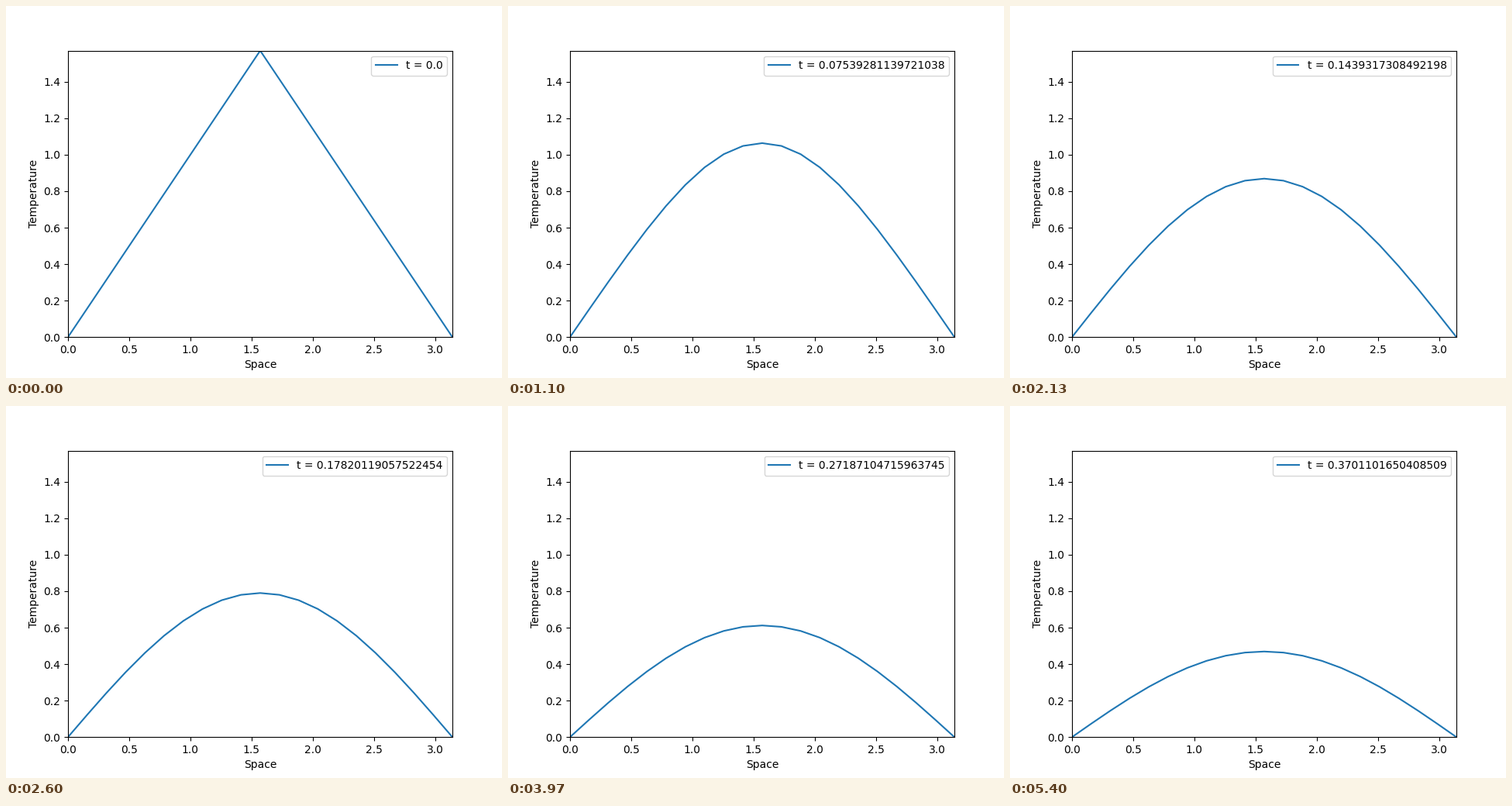
Recreate the animation shown at these times as a matplotlib script. Size 640x480 px, loop 5.43 s.

```python
import numpy as np
import matplotlib.pyplot as plt
from matplotlib.animation import FuncAnimation

LOOP_MS = 5430
FRAMES = 163
CELLS = 20
R = 0.25                  # diffusivity * dt / dx**2
DT = np.pi ** 2 / 4320    # R * dx**2 / 2.7


def solve(u, steps):
    """Explicit heat equation with both ends held at zero."""
    states = [u]
    for _ in range(steps - 1):
        u = u.copy()
        u[1:-1] += R * np.diff(states[-1], 2)
        states.append(u)
    return states


x = np.linspace(0, np.pi, CELLS + 1)
states = solve(np.minimum(x, np.pi - x), FRAMES)

plt.rcParams["font.family"] = "DejaVu Sans"
fig, ax = plt.subplots(figsize=(6.4, 4.8), dpi=100)
ax.set(xlim=(0, np.pi), ylim=(0, np.pi / 2),
       xlabel="Space", ylabel="Temperature")
line, = ax.plot(x, states[0], label="t = 0.0")
label = ax.legend(loc="upper right").get_texts()[0]


def update(n):
    line.set_ydata(states[n])
    label.set_text(f"t = {n * DT}")
    return line, label


anim = FuncAnimation(fig, update, frames=FRAMES, interval=LOOP_MS / FRAMES,
                     repeat=True, repeat_delay=0, blit=False)
plt.show()
```
